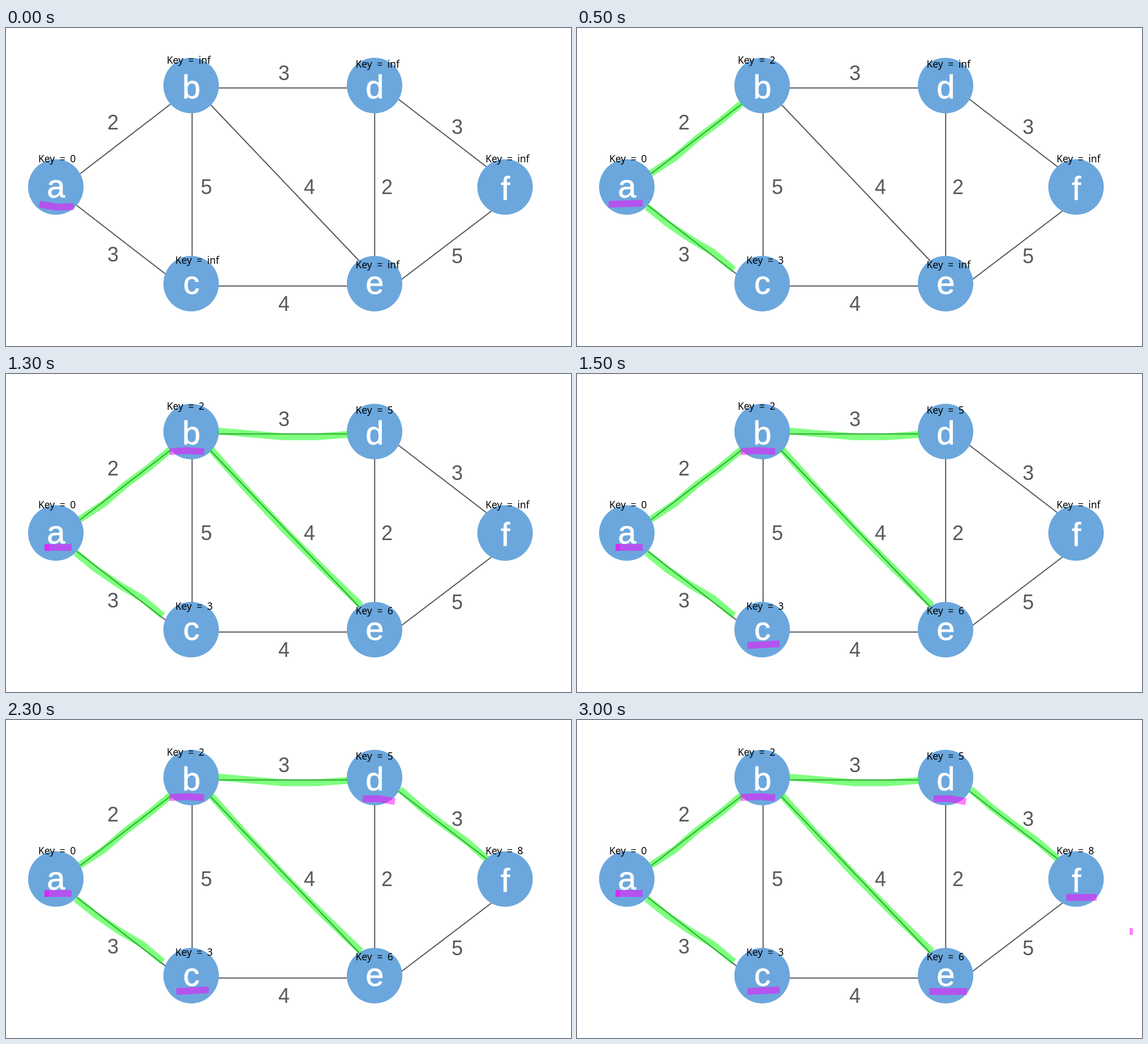
Write an HTML page that moves like this. It is 998 px wide and 561 px high and loops after 3.5 s.

```html
<!DOCTYPE html>
<html lang="en">
<head>
<meta charset="utf-8">
<title>Shortest paths</title>
<style>
  html, body { margin: 0; width: 100%; height: 100%; overflow: hidden; background: #fff; }
  svg { display: block; width: 998px; height: 561px; }
  path { fill: none; stroke-width: 12; stroke-linejoin: round; }
  .edge { stroke: #58595b; stroke-width: 2; }
  .node { fill: #6ba7dd; }
  .name, .weight { font-family: "Liberation Sans", Arial, sans-serif; text-anchor: middle; }
  .name { font-size: 58px; fill: #fff; stroke: #fff; stroke-width: .8; }
  .weight { font-size: 36px; fill: #58595b; }
  .key { font: 17.5px "Noto Sans", sans-serif; word-spacing: 3.9px; fill: #000; }
  .green { stroke: rgba(0, 255, 0, .5); }
  .pink { stroke: rgba(255, 0, 255, .5); }
</style>
</head>
<body>
<svg id="stage" viewBox="0 0 998 561"></svg>
<script>
const STEP = 500, STEPS = 7, RADIUS = 49;
const stage = document.getElementById('stage');

function add(tag, cls, attrs, text) {
  const el = document.createElementNS('http://www.w3.org/2000/svg', tag);
  el.setAttribute('class', cls);
  for (const k in attrs) el.setAttribute(k, attrs[k]);
  if (text !== undefined) el.textContent = text;
  return stage.appendChild(el);
}

// Visible from step `from` up to, not including, step `to`.
function during(el, from, to = STEPS) {
  const frames = [];
  for (let i = 0; i <= STEPS; i++) {
    const opacity = i >= from && i < to ? 1 : 0;
    frames.push({ opacity, offset: i / STEPS, easing: 'step-end' });
  }
  el.animate(frames, { duration: STEP * STEPS, iterations: Infinity });
}

// Path along an edge, pushed sideways by evenly spaced bends.
function alongEdge([x1, y1, x2, y2], bends, reach = 1) {
  const dx = x2 - x1, dy = y2 - y1, len = Math.hypot(dx, dy);
  const points = bends.map((b, i) => {
    const t = reach * i / (bends.length - 1);
    return [x1 + dx * t - b * dy / len, y1 + dy * t + b * dx / len];
  });
  return 'M' + points.join('L');
}

// Ends of each line, then weight and its centre
const edges = {
  ab: [131, 257, 291, 134, 2, 189, 167],
  ac: [125, 313, 283, 435, 3, 189, 400],
  bd: [375, 105.7, 604, 105.7, 3, 491, 80],
  bc: [328.7, 149, 328.7, 404, 5, 354, 281],
  be: [361, 135, 624, 411, 4, 536, 281],
  de: [651.2, 149, 651.2, 404, 2, 673, 281],
  df: [693, 125.5, 849, 245, 3, 797, 175],
  ef: [698, 444, 858, 322.5, 5, 797, 403],
  ce: [375, 455.3, 604, 455.3, 4, 491, 487]
};

// Name, centre, start of key label, key before and after step `at`
const nodes = [
  ['a', 88, 280.5, 57, 237, '0', '0', 1],
  ['b', 327, 101.5, 284, 62.5, 'inf', '2', 1],
  ['c', 327, 451, 299, 415.5, 'inf', '3', 1],
  ['d', 651, 101.5, 617.5, 69.5, 'inf', '5', 2],
  ['e', 651, 451, 617.5, 423.5, 'inf', '6', 2],
  ['f', 881.5, 280.5, 847, 237, 'inf', '8', 4]
];

const highlights = [
  ['ab', [-1, 3, 0, 1, -1], 1],
  ['ac', [3, 4, 1, -5, -3], 1, .95],
  ['bd', [-5, 0, 5, 5, 1], 2],
  ['be', [-2, 1, 2, 0, -4], 2],
  ['df', [-4, -1, -1, -3, 0], 4]
];

const underlines = [
  ['M59 311L90 316 120 315', 0, 1],
  ['M56 311L116 309', 1, 2],
  ['M68 306H76', 2],
  ['M68 306H116', 2],
  ['M289 137L320 135 350 137', 2],
  ['M301 479L358 476', 3],
  ['M630 139L660 139 687 144', 4],
  ['M622 479H689', 5],
  ['M864 313H918', 6],
  ['M976 373H982', 6]
];

for (const [x1, y1, x2, y2, weight, x, y] of Object.values(edges)) {
  add('line', 'edge', { x1, y1, x2, y2 });
  add('text', 'weight', { x, y: y + 12.3 }, weight);
}
for (const [name, cx, cy] of nodes) {
  const tall = 'bdf'.includes(name);
  add('circle', 'node', { cx, cy, r: RADIUS });
  add('text', 'name', { x: cx + .5, y: cy + (tall ? 22 : 18) }, name);
}
for (const [edge, bends, from, reach] of highlights) {
  during(add('path', 'green', { d: alongEdge(edges[edge], bends, reach) }), from);
}
for (const [d, from, to] of underlines) during(add('path', 'pink', { d }), from, to);
for (const [, , , x, y, before, after, at] of nodes) {
  during(add('text', 'key', { x, y }, 'Key = ' + before), 0, at);
  during(add('text', 'key', { x, y }, 'Key = ' + after), at);
}
</script>
</body>
</html>
```
